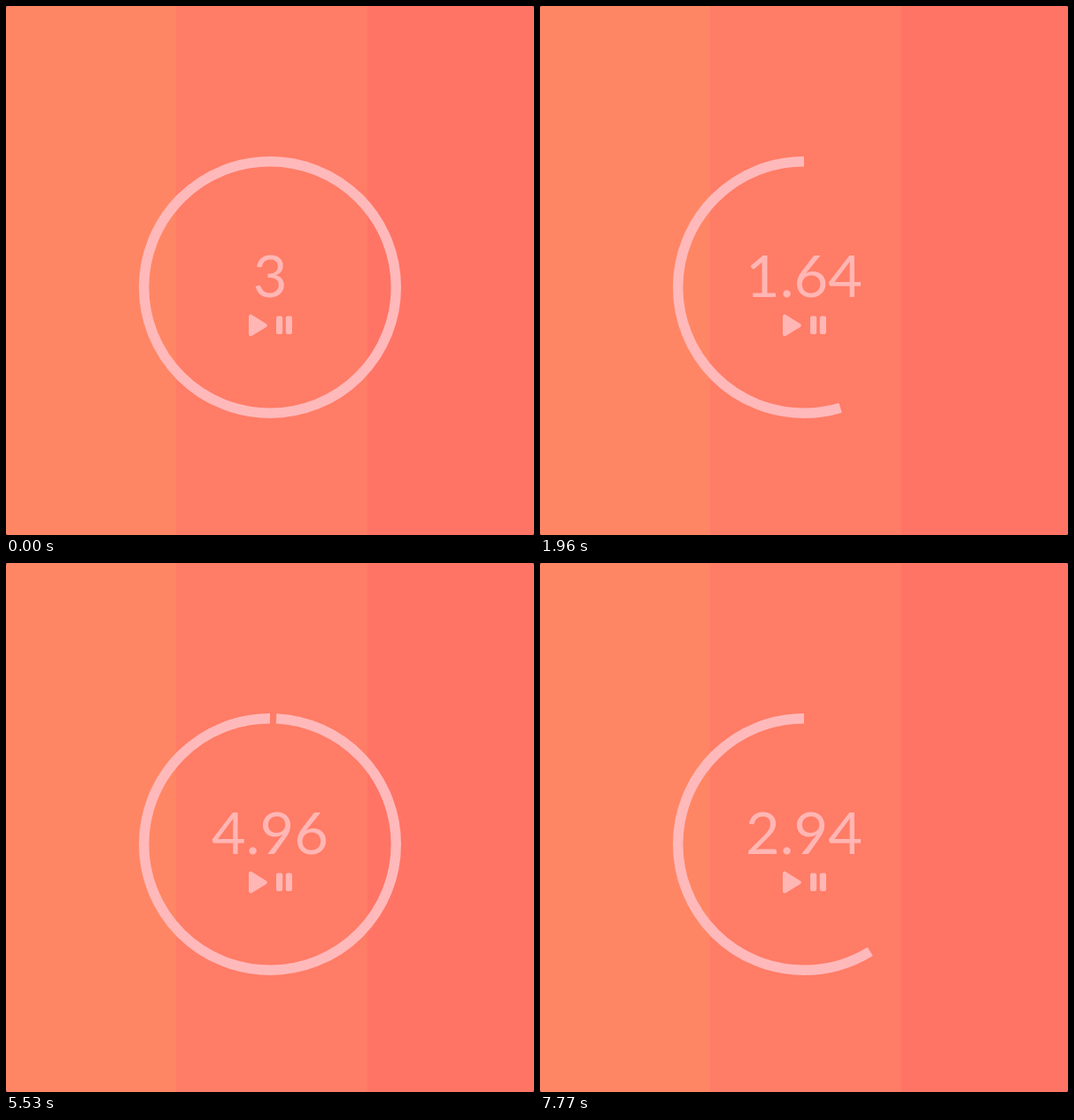
Recreate the animation shown at these times as an HTML page. Size 596 by 598 pixels, loop 8 s.

```html
<!DOCTYPE html>
<html lang="en">
<head>
<meta charset="utf-8">
<title>Timer</title>
<style>
  html, body { margin: 0; width: 100%; height: 100%; overflow: hidden; background: #6b3a2c; }
  svg { display: block; width: 596px; height: 598px; border-radius: 2px; }
  text { font: 400 66.8px Lato, sans-serif; font-kerning: none; text-anchor: middle; }
</style>
</head>
<body>
<svg viewBox="0 0 596 598">
  <rect width="192" height="598" fill="#ff8664"/>
  <rect x="192" width="216" height="598" fill="#ff7c66"/>
  <rect x="408" width="188" height="598" fill="#ff7465"/>
  <circle id="ring" cx="298" cy="318" r="142.3" pathLength="1" transform="rotate(-90 298 318)"
    fill="none" stroke="#ffb9bb" stroke-width="11.4"/>
  <rect id="selection" x="232" y="262" width="132" height="81" fill="#b8a3c3"/>
  <g fill="#ffb6b4">
    <text id="time" x="298" y="328.5">3</text>
    <rect id="caret" x="317" y="263" width="1.5" height="79"/>
    <path d="M276.2 350.8V371L292.6 361Z" stroke="#ffb6b4" stroke-width="4.4" stroke-linejoin="round"/>
    <rect x="305" y="350.5" width="7.2" height="20.5" rx="2"/>
    <rect x="315.8" y="350.5" width="7.2" height="20.5" rx="2"/>
  </g>
</svg>
<script>
const LOOP = 8000, STEP = 70;
const EDIT = { select: 3360, type: 4410, caretOff: 4900 };

// Each run counts down from a total through [ms, seconds left] points.
const runs = [
  { total: 3, points: [[560, 2.96], [1470, 2.1], [2520, 1.12], [2940, 0.74]] },
  { total: 5, points: [[5530, 4.96], [7000, 3.56], [7770, 2.94]] }
];

const el = id => document.getElementById(id);
const ring = el('ring'), label = el('time'), selection = el('selection'), caret = el('caret');

function remaining(points, t) {
  const next = points.findIndex(p => p[0] > t);
  if (next < 0) return points[points.length - 1][1];
  const [t0, v0] = points[next - 1], [t1, v1] = points[next];
  const value = v0 + (v1 - v0) * (t - t0) / (t1 - t0);
  return Math.round(value * 50) / 50;
}

function show(node, on) {
  node.setAttribute('visibility', on ? 'visible' : 'hidden');
}

function draw(t) {
  const run = runs.filter(r => t >= r.points[0][0]).pop();
  const left = run ? remaining(run.points, t) : 3;
  const part = run ? left / run.total : 1;
  const typed = run === runs[0] && t >= EDIT.type;

  label.textContent = typed ? '5' : run ? left.toFixed(2) : '3';
  ring.setAttribute('stroke-dasharray', part + ' 1');
  ring.setAttribute('stroke-dashoffset', part - 1);
  show(selection, t >= EDIT.select && t < EDIT.type);
  show(caret, typed && t < EDIT.caretOff);
}

const start = performance.now();
function frame() {
  const t = (performance.now() - start) % LOOP;
  draw(Math.floor(t / STEP) * STEP);
  requestAnimationFrame(frame);
}
frame();
</script>
</body>
</html>
```
